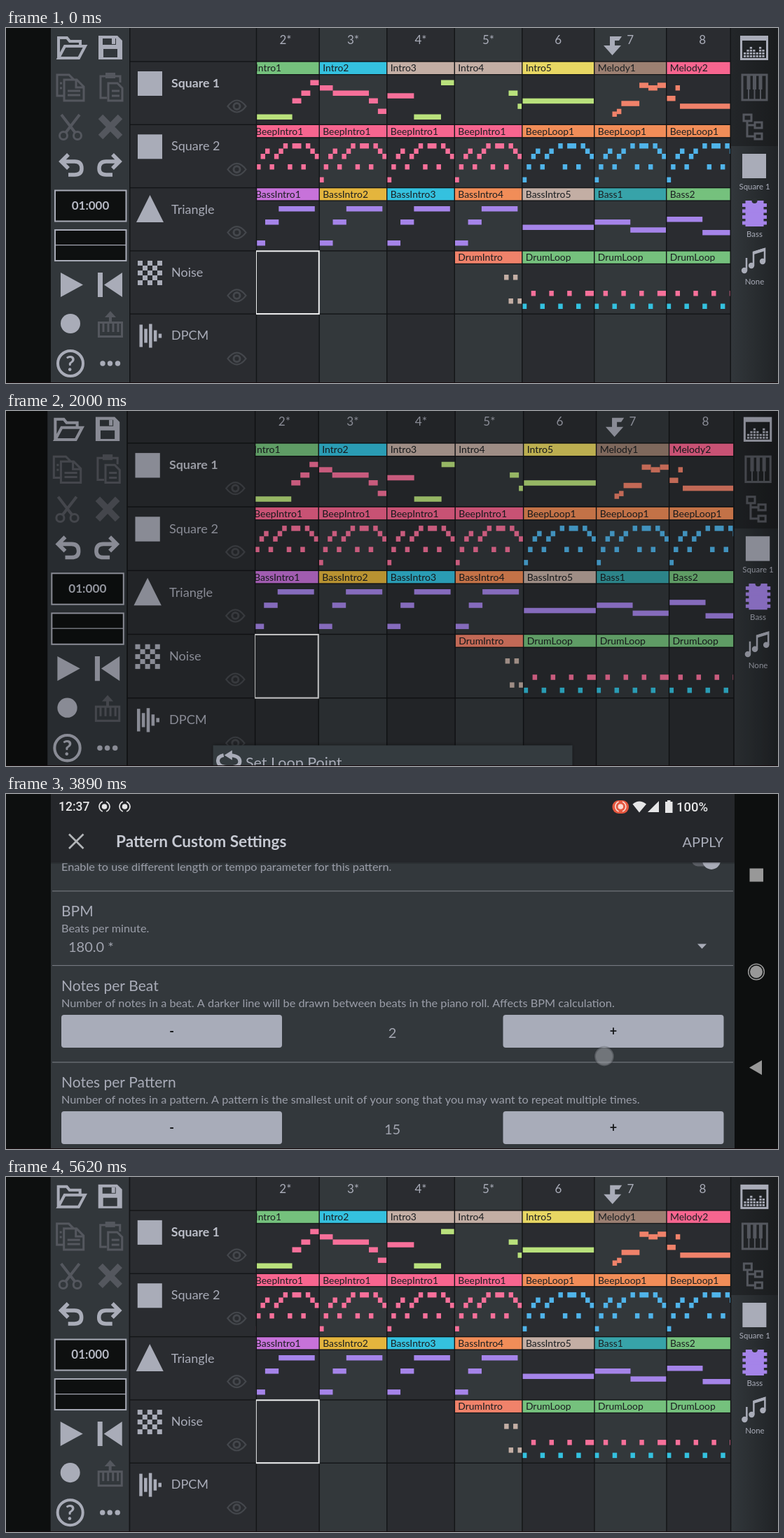
These frames come from a looping animation (1102x508 px, 5.69 s). An HTML page with a canvas:

```html
<!DOCTYPE html>
<html lang="en">
<head>
<meta charset="utf-8">
<title>Pattern custom settings</title>
<style>
html, body { margin: 0; width: 100%; height: 100%; overflow: hidden; background: #0d0f0f; }
canvas { display: block; }
</style>
</head>
<body>
<canvas width="1102" height="508"></canvas>
<script>
const LOOP = 5690, W = 1102, H = 508;
const ctx = document.querySelector('canvas').getContext('2d');
const ICON = '#a9acb8', FAINT = '#54575e', DARK = '#2a2c30', MID = '#33383b', LINE = '#131517';

// Drawing helpers
const rect = (color, x, y, w, h) => { ctx.fillStyle = color; ctx.fillRect(x, y, w, h); };
const frame = (color, x, y, w, h, lw = 2) => {
  ctx.strokeStyle = color; ctx.lineWidth = lw; ctx.strokeRect(x, y, w, h);
};
const fill = (color, d) => { ctx.fillStyle = color; ctx.fill(new Path2D(d), 'evenodd'); };
const stroke = (color, lw, d) => {
  ctx.strokeStyle = color; ctx.lineWidth = lw; ctx.stroke(new Path2D(d));
};
const disc = (color, x, y, r) => {
  ctx.fillStyle = color; ctx.beginPath(); ctx.arc(x, y, r, 0, 7); ctx.fill();
};
const ring = (color, x, y, r, lw = 2, from = 0, to = 2 * Math.PI) => {
  ctx.strokeStyle = color; ctx.lineWidth = lw;
  ctx.beginPath(); ctx.arc(x, y, r, from, to); ctx.stroke();
};
const box = (color, x, y, w, h, r) => {
  ctx.fillStyle = color; ctx.beginPath(); ctx.roundRect(x, y, w, h, r); ctx.fill();
};
function text(s, x, y, size, { color = ICON, weight = 400, align = 'left', font = 'Lato' } = {}) {
  ctx.font = `${weight} ${size}px ${font}, sans-serif`;
  ctx.textAlign = align; ctx.fillStyle = color; ctx.fillText(s, x, y);
}
function blend(x0, x1, from, to) {
  const g = ctx.createLinearGradient(x0, 0, x1, 0);
  g.addColorStop(0, from); g.addColorStop(1, to);
  return g;
}
function layer(alpha, scale, draw) {
  ctx.save();
  ctx.globalAlpha = alpha;
  ctx.translate(W / 2, H / 2); ctx.scale(scale, scale); ctx.translate(-W / 2, -H / 2);
  draw();
  ctx.restore();
}
// Value at time t along [time, value] keys
function along(t, keys) {
  if (t <= keys[0][0]) return keys[0][1];
  for (let i = 1; i < keys.length; i++) {
    const [t0, a] = keys[i - 1], [t1, b] = keys[i];
    if (t < t1) return a + (b - a) * (t - t0) / (t1 - t0);
  }
  return keys[keys.length - 1][1];
}
const easeOut = p => 1 - (1 - p) ** 3;

// Song data: notes are [start, length, y]
const COLOR = {
  green: '#75c17d', cyan: '#34c1df', tan: '#c3aea4', yellow: '#e8d763', brown: '#9c8072',
  pink: '#f7658f', orange: '#f18d58', violet: '#c772da', gold: '#e4b53d', teal: '#37a3a9',
  coral: '#f0826a', lime: '#b9e17c', rose: '#f7709a', blue: '#50b4ea', purple: '#a584e9'
};
// The second half of the beep melody begins at unit `half`
const beep = half => [[0, 1, 213.5],
  ...[0, half].flatMap(u => [[u + 1, 1, 195], [u + 4, 1, 195]]),
  [2, 1, 180], [3, 1, 172.5], [5, 1, 180], [6, 1, 172.5],
  [half, 1, 165], [half + 2, 2, 165], [half + 5, 1, 165], [half + 6, 1, 172.5], [half + 7, 1, 180]];
const beepIntro = { rose: beep(7) };
const beepLoop = { blue: beep(8) };
const bassIntro = { purple: [[0, 3, 304], [3, 3, 274], [6, 8, 255]] };
const drumLoop = {
  rose: [[2, 1, 376], [6, 1, 376], [10, 1, 376], [14, 2, 376]],
  cyan: [0, 4, 8, 12].map(u => [u, 1, 394.5])
};
const TRACKS = [
  ['Square 1', [
    ['Intro1', 'green', { lime: [[0, 9, 123.5]], rose: [[9, 2, 100.5], [11, 2, 89.5], [13, 2, 74.5]] }],
    ['Intro2', 'cyan', { rose: [[0, 3, 82], [3, 8, 89.5], [11, 2, 100.5], [13, 2, 115.5]] }],
    ['Intro3', 'tan', { rose: [[0, 6, 93.3]], lime: [[6, 6, 123.5], [12, 3, 74.5]] }],
    ['Intro4', 'tan', { lime: [[12, 2, 89.5], [14, 1, 108.3]] }],
    ['Intro5', 'yellow', { lime: [[0, 16, 100.7]] }],
    ['Melody1', 'brown', { coral: [[4, 1, 119.5], [5, 1, 115.7], [6, 4, 104.3], [10, 2, 78.3], [12, 2, 82], [14, 2, 78.3]] }],
    ['Melody2', 'pink', { coral: [[0, 2, 97], [2, 1, 82], [3, 13, 108.2]] }]]],
  ['Square 2', [...Array(4).fill(['BeepIntro1', 'pink', beepIntro]),
    ...Array(3).fill(['BeepLoop1', 'orange', beepLoop])]],
  ['Triangle', [
    ...['violet', 'gold', 'cyan', 'orange'].map((c, i) => ['BassIntro' + (i + 1), c, bassIntro]),
    ['BassIntro5', 'tan', { purple: [[0, 16, 281.5]] }],
    ['Bass1', 'teal', { purple: [[0, 8, 274], [8, 8, 285.3]] }],
    ['Bass2', 'green', { purple: [[0, 8, 270], [8, 8, 289]] }]]],
  ['Noise', [, , , ['DrumIntro', 'coral', { tan: [[11, 1, 353], [13, 1, 353], [12, 1, 387], [14, 1, 387]] }],
    ...Array(3).fill(['DrumLoop', 'green', drumLoop])]],
  ['DPCM', []]
];
const UNIT = 6.435;
const colX = i => 350.7 + UNIT * (i < 5 ? 15 * i : 60 + 16 * (i - 4));
const rowY = i => 48 + 90.3 * i;

function eye(x, y) {
  const c = '#44474c';
  stroke(c, 2.2, `M${x - 13} ${y}Q${x} ${y - 17} ${x + 13} ${y}Q${x} ${y + 17} ${x - 13} ${y}Z`);
  ring(c, x, y, 4.5, 3);
}

function trackIcon(i) {
  if (i < 2) rect(ICON, 188, rowY(i) + 14, 35, 35);
  if (i === 2) fill(ICON, 'M205.5 239L225 278H186Z');
  if (i === 3) for (let k = 0; k < 25; k += 2) rect(ICON, 188 + k % 5 * 7, 333 + Math.floor(k / 5) * 7, 7, 7);
  if (i === 4) [32, 20, 34, 16, 6].forEach((h, k) => rect(ICON, 190.5 + k * 6.8, 440.5 - h / 2, 4.5, h));
}

function leftTools() {
  rect('#32373b', 64, 0, 112, H);
  stroke(ICON, 4, 'M75 42V14H87L91 19H106V25M75 43L84 26H113L104 43Z');
  fill(ICON, 'M132 11H159L166 18V45H132ZM138 15V24H157V15ZM139 30V42H159V30Z');
  rect(ICON, 151, 15, 5, 8);
  stroke(FAINT, 3, 'M82 97H73V67H90L97 74M83 74H101L111 84V104H83ZM100 74V85H111M88 90H106M88 96H106M77 79H80M77 86H80');
  stroke(FAINT, 3, 'M144 100H135V69H163V78M146 79H159L166 86V104H146ZM151 90H162M151 97H162');
  rect(FAINT, 142, 64, 14, 8);
  ring(FAINT, 82, 154, 5.5, 3); ring(FAINT, 102, 154, 5.5, 3);
  stroke(FAINT, 4, 'M79 124L99 150M105 124L85 150');
  stroke(FAINT, 9, 'M135 127L163 156M163 127L135 156');
  for (const [x, dir] of [[93, 1], [148, -1]]) {
    ctx.save(); ctx.translate(x, 0); ctx.scale(dir, 1);
    stroke(ICON, 5.5, 'M-4 181L-14 191L-4 201M-14 191H5Q15 191 15 201Q15 210 5 210H-4');
    ctx.restore();
  }
  rect('#0e1010', 69, 232, 103, 45); frame(ICON, 70, 232.5, 101.5, 44);
  text('01:000', 120.5, 260, 17, { weight: 700, align: 'center', color: '#b6b9c4' });
  rect('#0e1010', 69, 288, 103, 45); frame(ICON, 70, 289, 101.5, 44);
  rect(ICON, 70, 310, 101, 1.2);
  fill(ICON, 'M78 350L110 367.5L78 385Z');
  fill(ICON, 'M131 350H138V385H131ZM166 350V385L140 367.5Z');
  disc(ICON, 92, 423, 14);
  frame(FAINT, 132.5, 421.5, 33, 20, 3);
  for (const x of [139, 146, 153, 160]) rect(FAINT, x - 1.5, 422, 3, 13);
  fill(FAINT, 'M149 405L157 414H151V421H147V414H141Z');
  ring(ICON, 92, 480, 18, 4);
  text('?', 92, 491, 30, { weight: 700, align: 'center' });
  for (const x of [138, 148.5, 159.5]) disc(ICON, x, 480, 3.7);
}

function rightTools() {
  rect(blend(1034, W, '#32373b', '#202326'), 1034, 0, 68, H);
  rect(blend(1034, W, '#232629', '#1a1c1e'), 1034, 0, 68, 169);
  rect(LINE, 1033.5, 0, 1.5, H);
  frame(ICON, 1049.5, 12.5, 37, 32, 3);
  rect(ICON, 1049, 12, 38, 6);
  [5, 9, 16, 11, 7, 13, 9].forEach((h, k) => {
    for (let y = 0; y < h; y += 4) rect(ICON, 1053 + k * 4.4, 39 - y, 3.2, 2.8);
  });
  frame(FAINT, 1051, 67, 35, 36, 3);
  for (const x of [1060, 1068.5, 1077]) { rect(FAINT, x - 2.5, 67, 5, 21); rect(FAINT, x - 1, 87, 2, 16); }
  frame(FAINT, 1053, 124, 11, 9, 3); frame(FAINT, 1069, 135, 10, 8, 3); frame(FAINT, 1069, 151, 10, 8, 3);
  stroke(FAINT, 3, 'M1058 133V155H1069M1058 139H1069');
  rect(ICON, 1051, 180, 34, 35);
  const label = (s, y) => text(s, 1068.5, y, 11.4, { align: 'center' });
  label('Square 1', 231);
  rect(COLOR.purple, 1055.5, 247, 26, 37);
  for (let y = 251; y < 280; y += 8.5) rect(COLOR.purple, 1051, y, 35, 5);
  disc('#2b2f32', 1068.5, 247, 4);
  label('Bass', 299);
  for (const [x, y] of [[1054, 347], [1064, 340], [1080, 334]]) disc(ICON, x, y, 4.2);
  stroke(ICON, 2.5, 'M1057 347V329M1067 340V321L1083 316V334');
  stroke(ICON, 4, 'M1067 322L1083 317');
  label('None', 367);
}

function mainScreen() {
  rect('#0d0f0f', 0, 0, W, H);
  rect(DARK, 176, 0, 860, H);
  ctx.save();
  ctx.beginPath(); ctx.rect(357, 0, 677, H); ctx.clip();
  for (let c = 0; c < 7; c++) {
    const x = colX(c), w = colX(c + 1) - x;
    rect(c % 2 ? MID : DARK, x, 0, w, H);
    const mark = c + 2 + (c < 4 ? '*' : '');
    text(mark, x + w / 2, 23, 17, { align: 'center' });
  }
  TRACKS.forEach(([, patterns], r) => patterns.forEach(([name, color, voices], c) => {
    const x = colX(c), y = rowY(r), w = colX(c + 1) - x;
    rect(COLOR[color], x, y, w, 18);
    rect(LINE, x, y + 18, w, 1.2);
    text(name, c ? x + 5 : 356, y + 14.3, 13.9, { color: '#1b1e21' });
    for (const voice in voices)
      for (const [u, len, ny] of voices[voice]) rect(COLOR[voice], x + u * UNIT, ny, len * UNIT, 7.5);
  }));
  for (let c = 1; c < 7; c++) rect(LINE, colX(c) - 0.7, 0, 1.4, H);
  ctx.restore();
  for (let r = 0; r < 5; r++) rect(LINE, 177, rowY(r) - 0.7, 857, 1.4);
  rect(LINE, 356.8, 0, 1.4, H);
  TRACKS.forEach(([name], r) => {
    trackIcon(r);
    text(name, 236, rowY(r) + 37, r ? 18 : 17.7, { weight: r ? 400 : 700, color: r ? ICON : '#bdc0ca' });
    eye(329.5, rowY(r) + 64);
  });
  fill(ICON, 'M862 12H879L875 18H869V25H878L865.5 39L853 25H862Z');
  ctx.save();
  ctx.beginPath(); ctx.rect(357, 310, 100, 110); ctx.clip();
  frame('#f2f3f4', 357, 319.3, 89.8, 89.8);
  ctx.restore();
  leftTools();
  rect(LINE, 176, 0, 1.5, H);
  rightTools();
}

function menu(open) {
  if (open <= 0) return;
  rect(`rgba(0,0,0,${0.54 * open})`, 0, 0, W, H);
  ctx.save();
  ctx.translate(0, 94 * (1 - open));
  ctx.shadowColor = 'rgba(0,0,0,.6)'; ctx.shadowBlur = 5;
  rect('#343b3f', 298, 416, 508, 100);
  ctx.shadowColor = 'transparent';
  stroke(ICON, 5, 'M313 430Q304 432 305 439Q306 447 320 447Q336 447 336 439Q336 431 322 430');
  fill(ICON, 'M325 423V437L314 430Z');
  frame(ICON, 304, 472, 33, 27, 3);
  rect(ICON, 303, 471, 35, 6);
  ring(ICON, 320.5, 487.5, 7.5, 2.5);
  stroke(ICON, 2, 'M317 484L320.5 488L324 485');
  text('Set Loop Point', 344, 448, 21.3);
  text('Custom Pattern Settings...', 344, 494, 21.3);
  ctx.restore();
}

const heading = (s, y) => text(s, 79, y, 21);
const note = (s, y) => text(s, 79, y, 16.25, { color: '#9b9ea9' });
const value = (s, x, y, align) => text(s, x, y, 20, { align, color: '#a2a5b0' });
const rule = y => rect('#7d8188', 66, y, 972, 1);
const dropArrow = y => fill(ICON, `M987 ${y - 3}H1000L993.5 ${y + 4}Z`);
function stepper(s, y) {
  for (const [x, sign] of [[79, '-'], [709.5, '+']]) {
    box('#a8acb9', x, y, 315, 47, 4);
    text(sign, x + 157.5, y + 30, 18, { weight: 700, align: 'center', color: '#17191b' });
  }
  value(s, 551.5, y + 33, 'center');
}

function settings() {
  heading('Custom Pattern', 137);
  note('Enable to use different length or tempo parameter for this pattern.', 160);
  box('#5b5e65', 979, 136, 36, 17, 8.5);
  disc(ICON, 1007, 144.5, 13);
  rule(188);
  heading('BPM', 225);
  note('Beats per minute.', 248);
  value('180.0 *', 89, 276);
  dropArrow(267);
  rule(294.5);
  heading('Notes per Beat', 332);
  note('Number of notes in a beat. A darker line will be drawn between beats in the piano roll. Affects BPM calculation.', 354.5);
  stepper('2', 365.5);
  rule(433);
  heading('Notes per Pattern', 470);
  note('Number of notes in a pattern. A pattern is the smallest unit of your song that you may want to repeat multiple times.', 492.5);
  stepper('15', 503.5);
  rule(570.5);
  heading('Frames per Note', 608);
  note('Number of frames (1/60th of a second in NTSC, 1/50th in PAL) in a notes. This is computed automatically from the BPM.', 630.5);
  value('10', 79, 658);
  rule(675);
  heading('Advanced Properties', 712);
  note('These properties are meant for more advanced users', 734.5);
  heading('Groove', 787);
  note('The sequence of frame counts that will be executed to achieve the desired BPM.', 809.5);
  value('10', 89, 838);
  dropArrow(829);
  rule(856.5);
  heading('Groove Padding', 894);
  note('Determines where an empty frame will be injected when the current groove value is higher than the number of frames in a note.', 916.5);
}

function castIcon(x, color) {
  disc(color, x, 18, 3.8);
  for (const middle of [0, Math.PI]) ring(color, x, 18, 7.5, 1.7, middle - 1.2, middle + 1.2);
}

function statusBar(leaving) {
  const white = leaving ? '#8d8f91' : '#e6e6e7';
  if (!leaving) {
    text('12:37', 75, 24, 17.5, { weight: 500, font: 'Roboto', color: white });
    castIcon(140.5, white); castIcon(169.5, white);
    box('#e4573f', 865.5, 9, 23.5, 19, 9);
    castIcon(877.3, '#f8d9d2');
    fill(white, 'M894.5 14.5Q904 6.5 914 14.5L904 26.5Z');
    fill(white, 'M932 10V26H916Z');
  }
  fill(white, 'M944 9H948.5V11H951.5V27H941V11H944Z');
  text('100%', 957, 24.5, 18.5, { weight: 500, font: 'Roboto', color: white });
}

function navBar(pressed) {
  if (pressed) box('#2e2e2e', 1040, 330, 62, 123, 31);
  const c = pressed ? '#e4e4e4' : '#989898';
  rect(c, 1061.5, 106.5, 19.5, 19);
  disc(c, 1071, 254.5, 9); ring(c, 1071, 254.5, 11.3, 1.5);
  fill(c, 'M1079 381V402L1061 391.5Z');
}

function dialog(scroll, bars, leaving) {
  rect('#0d0f0f', 0, 0, W, H);
  rect('#33383c', 64, 98, 976, H - 98);
  ctx.save();
  ctx.beginPath(); ctx.rect(64, 98, 976, H - 98); ctx.clip();
  ctx.translate(0, -scroll);
  settings();
  ctx.restore();
  rect('rgba(0,0,0,.15)', 64, 98, 976, 2);
  rect('#25272b', 64, 0, 976, 98);
  stroke('#b2b5b8', 2.7, 'M90 57.5L110.5 78M110.5 57.5L90 78');
  text('Pattern Custom Settings', 157, 76, 22.6, { weight: 700, color: '#c6c9d2' });
  text('APPLY', 1024, 76, 20, { align: 'right' });
  ctx.globalAlpha *= bars;
  statusBar(leaving);
  navBar(leaving);
}

function touch(x, y) {
  disc('rgba(165,170,175,.35)', x, y, 14);
  disc('rgba(165,170,175,.3)', x, y, 12);
  ring('rgba(40,45,48,.25)', x, y, 14, 1.5);
}

// Each press: start, end, and a place that may depend on time
const SWIPE_UP = [[2750, 440], [2920, 215]];
const DRAG_ONE = [[3150, 177], [3280, 190], [3490, 327]];
const DRAG_TWO = [[3690, 225], [3760, 260], [3890, 375], [3960, 405]];
const PRESSES = [
  [330, 860, () => [399, 22]],
  [1740, 1880, () => [455, 486]],
  [2750, 2930, t => [950, along(t, SWIPE_UP)]],
  [3150, 3500, t => [967 - (t - 3150) * 0.06, along(t, DRAG_ONE)]],
  [3690, 3960, t => [866 - (t - 3690) * 0.06, along(t, DRAG_TWO)]],
  [5340, 5440, () => [1073, 408]]
];
const SCROLL = [[2750, 0], [2820, 120], [2880, 290], [2950, 403], [3150, 403], [3280, 390], [3490, 253],
  [3600, 212], [3690, 200], [3760, 165], [3890, 50], [3960, 22], [4090, 8], [4220, 2], [4350, 0]];

function render(t) {
  const open = easeOut(along(t, [[780, 0], [1340, 1]])) * along(t, [[1860, 1], [2080, 0]]);
  const entering = easeOut(along(t, [[1980, 0], [2280, 1]]));
  const leaving = t >= 5340;
  const dialogAlpha = along(t, [[2030, 0], [2150, 1], [5360, 1], [5480, 0]]);

  if (dialogAlpha < 1) {
    const back = easeOut(along(t, [[5370, 0], [5690, 1]]));
    const scale = leaving ? 1.07 - 0.07 * back : 1 + 0.05 * entering;
    layer(1, scale, () => { mainScreen(); menu(open); });
  }
  if (dialogAlpha > 0) {
    const scale = leaving ? along(t, [[5360, 1], [5560, 0.92]]) : 0.88 + 0.12 * entering;
    layer(dialogAlpha, scale, () => dialog(along(t, SCROLL), along(t, [[2290, 0], [2490, 1]]), leaving));
  }
  rect('#170b0e', 0, 507, W, 1);
  for (const [from, to, place] of PRESSES) if (t >= from && t < to) touch(...place(t));
}

const start = performance.now();
function tick() {
  render((performance.now() - start) % LOOP);
  requestAnimationFrame(tick);
}
tick();
</script>
</body>
</html>
```
